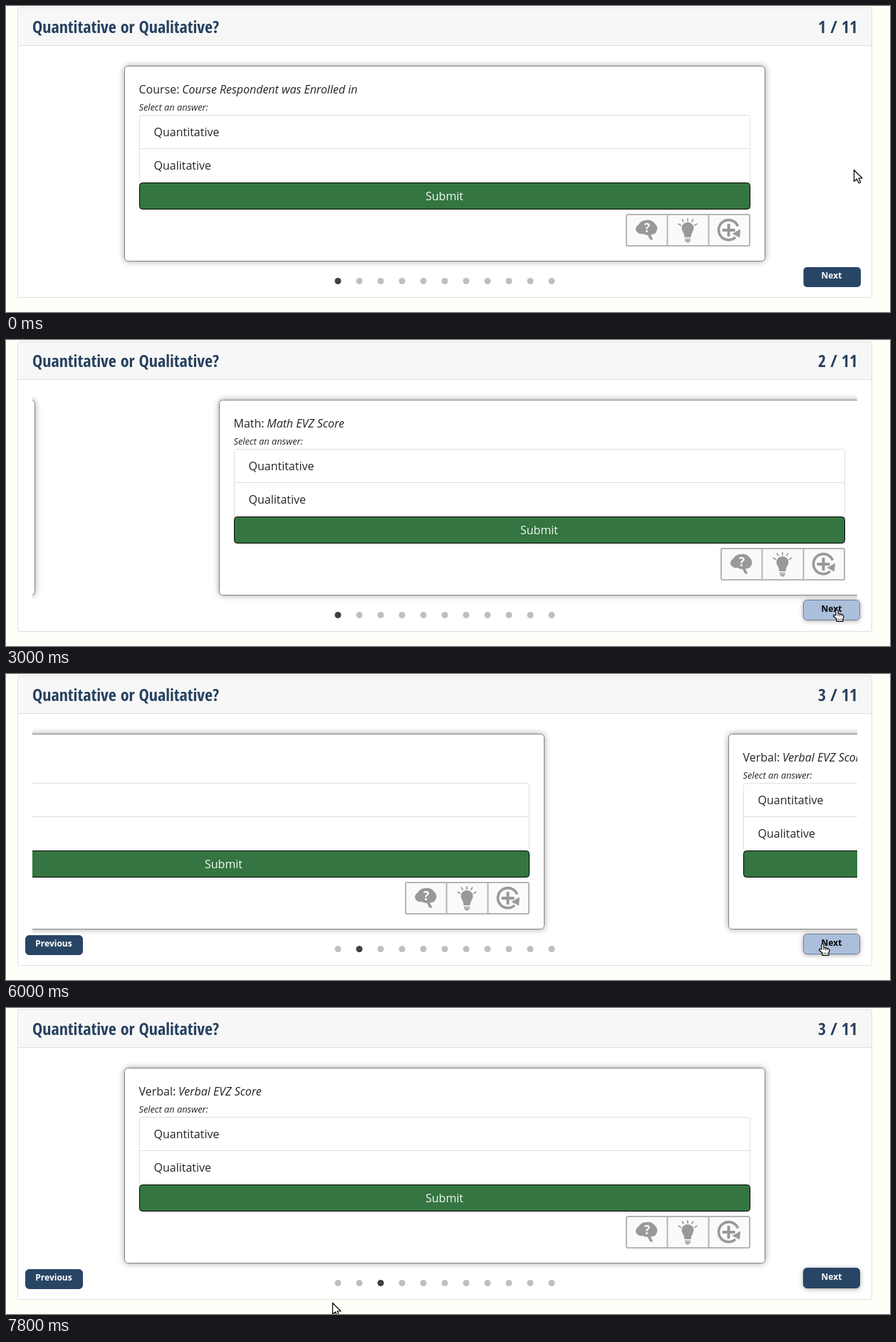
These frames come from a looping animation (1241x430 px, 8000 ms). An HTML page:

```html
<!DOCTYPE html>
<html lang="en">
<head>
<meta charset="utf-8">
<title>Quiz slides</title>
<style>
  html, body { margin: 0; width: 100%; height: 100%; overflow: hidden; background: #fffffa; }
  svg { display: block; width: 1241px; height: 430px; }
  text { font: 16px "Open Sans", sans-serif; fill: #212529; }
  .title { font: 700 24px "Open Sans Condensed", "Open Sans", sans-serif; font-stretch: condensed; fill: #26415f; }
  .hint { font-size: 12.8px; font-style: italic; }
  .italic { font-style: italic; }
  .label { font-size: 12px; font-weight: 700; text-anchor: middle; fill: #fff; }
  .card { fill: #fff; stroke: #858585; filter: drop-shadow(0 0 4px rgba(0, 0, 0, .38)); }
  .line { fill: none; stroke: #dfdfdf; }
  .gray { fill: #999; }
  .stroke { fill: none; stroke: #999; }
  .pointer { fill: #fff; stroke: #000; stroke-width: 1.2; stroke-linejoin: round; }
</style>
</head>
<body>
<svg viewBox="0 0 1241 430">
  <defs>
    <clipPath id="view"><rect x="37" y="70" width="1158" height="300"/></clipPath>
    <g id="card">
      <rect class="card" x="166.5" y="84.5" width="899" height="274" rx="5"/>
      <text class="hint" x="186.5" y="147">Select an answer:</text>
      <path class="line" d="M187.5 248V156.5q0-3 3-3H1041.5q3 0 3 3V248M187 200.5H1045"/>
      <text x="207.5" y="183">Quantitative</text>
      <text x="207.5" y="230">Qualitative</text>
      <rect x="187.5" y="248.5" width="857" height="37" rx="4" fill="#347541" stroke="#000"/>
      <text x="615.5" y="273" text-anchor="middle" style="fill:#f4f8f4">Submit</text>
      <g fill="#f9fafb" stroke="#b5b5b5" stroke-width="2">
        <rect x="871" y="293" width="173" height="44" rx="2"/>
        <path d="M928.5 293V337M986.5 293V337"/>
      </g>
      <path class="gray" d="M884 314c0-4 3-6 5-8 2-4 7-5 10-5 6-1 10 2 12 5 4 3 4 8 2 11-1 3-4 4-6 4l-2 1 3 5-1 2-3-1-3-6c-3 0-5-1-7-2-4 1-9-1-10-6z"/>
      <text x="900" y="317.500" text-anchor="middle" style="font-size:17px;font-weight:700;fill:#fff">?</text>
      <path class="gray" d="M952.5 325q0-4-2-7-2-3-2-6a8.5 8 0 0 1 17 0q0 3-2 6-2 3-2 7z"/>
      <path class="stroke" stroke-width="1.6" d="M953 327.5h8M953 329.700h8M955 331.5h4M957 298v5M949 299.5l2.5 4M965 299.5l-2.5 4M943.5 306l4.5 2.5M970.5 306l-4.5 2.5"/>
      <path class="stroke" stroke-width="3.6" d="M1027.5 309.5a14 14 0 1 0-3.500 15.500"/>
      <path class="stroke" stroke-width="4" d="M1014.5 306V324M1005.5 315H1023.500"/>
      <path class="gray" d="M1031 313.500L1030 325.500L1019.500 320z"/>
    </g>
  </defs>

  <rect x="16.5" y="2.5" width="1199" height="407" rx="2" fill="#fff" stroke="#dfdfdf"/>
  <path d="M17 3H1215V55H17z" fill="#f7f7f7"/>
  <path class="line" d="M17 55.5H1215"/>
  <text class="title" x="37" y="38">Quantitative or Qualitative?</text>
  <text class="title" id="count" x="1195" y="38" text-anchor="end"></text>

  <g clip-path="url(#view)"><g id="track"></g></g>
  <g id="dots"></g>

  <g id="previous">
    <rect x="27.5" y="367.5" width="80" height="27" rx="5" fill="#284565" stroke="#30406b"/>
    <text class="label" x="67" y="383">Previous</text>
  </g>
  <g id="next">
    <rect x="1119.5" height="28" rx="5"/>
    <text class="label" x="1159">Next</text>
  </g>

  <path id="arrow" class="pointer" d="M.5.5V16.5L4.300 13l3 6 2.5-1.200L7 12h5z"/>
  <g id="hand">
    <path class="pointer" d="M-1 8V.8q1.5-1.600 3 0V5.5l2.300.3 2.200.6 2.200.8q1.500.6 1.300 2.500L9 13v3.300H0V13L-4.500 9q.3-2.300 2.200-1.500z"/>
    <path d="M2 6v3M4.500 6.500v3M7 7v2.500M2.500 14.500v-2M4.700 14.500v-2M7 14.500v-2" stroke="#000" stroke-width=".8"/>
  </g>
</svg>
<script>
const $ = id => document.getElementById(id);
const LOOP = 8000, TICK = 100, PITCH = 1158, SLIDE = 500;

const slides = [
  ["Course:", "Course Respondent was Enrolled in"],
  ["Math:", "Math EVZ Score"],
  ["Verbal:", "Verbal EVZ Score"]
];

// Each slide change loses some time while the page lags.
const changes = [
  { start: 2300, lagFrom: 2400, lagTo: 2800, lost: 400 },
  { start: 5780, lagFrom: 5800, lagTo: 6400, lost: 378 }
];
const hovers = [{ enter: 1000, leave: 3700 }, { enter: 4900, leave: 7100 }];
const press = { down: 2200, up: 2900 };
const moves = [
  { start: 0, end: 0, to: [1190, 230] },
  { start: 300, end: 1200, to: [1166, 379] },
  { start: 3500, end: 4200, to: [1105, 407] },
  { start: 4700, end: 5300, to: [1146, 379] },
  { start: 7000, end: 7500, to: [840, 415] },
  { start: 7600, end: 7800, to: [458, 414] }
];

const ramp = (t, from, to) => t >= to ? 1 : Math.max(0, (t - from) / (to - from));
const smooth = u => u * u * (3 - 2 * u);
const easeOut = u => u * (2 - u);
const lerp = (a, b, k) => a.map((v, i) => Math.round(v + (b[i] - v) * k));
const rgb = (a, b, k) => `rgb(${lerp(a, b, k)})`;

// cubic-bezier(.25, .1, .25, 1), solved by bisection
function cssEase(x) {
  if (x <= 0 || x >= 1) return x <= 0 ? 0 : 1;
  let low = 0, high = 1, s;
  for (let i = 0; i < 24; i++) {
    s = (low + high) / 2;
    if (.75 * s * (1 - s) + s ** 3 < x) low = s; else high = s;
  }
  return .3 * s * (1 - s) ** 2 + 3 * (1 - s) * s * s + s ** 3;
}

function progress(change, t) {
  const elapsed = t - change.start - change.lost * ramp(t, change.lagFrom, change.lagTo);
  return cssEase(elapsed / SLIDE);
}

function pointerAt(t) {
  return moves.reduce((at, m) => lerp(at, m.to, easeOut(ramp(t, m.start, m.end))), [0, 0]);
}

$("track").innerHTML = slides.map(([name, detail], i) =>
  `<g transform="translate(${i * PITCH})"><use href="#card"/>
   <text x="186.5" y="123">${name} <tspan class="italic" dx="-.5">${detail}</tspan></text></g>`).join("");
$("dots").innerHTML = Array.from({ length: 11 }, (_, i) =>
  `<circle cx="${466 + 30 * i}" cy="386.5" r="4.5"/>`).join("");

const dots = [...$("dots").children];
const [nextBox, nextText] = $("next").children;

function drawSlides(t) {
  const steps = changes.map(change => progress(change, t));
  const position = steps.reduce((sum, p) => sum + p, 0);
  const active = steps.filter(p => p === 1).length;
  $("track").setAttribute("transform", `translate(${-Math.round(position * PITCH)})`);
  $("count").textContent = `${1 + steps.filter(p => p > 0 || p === 1).length} / 11`;
  dots.forEach((dot, i) => dot.setAttribute("fill", i === active ? "#404040" : "#bfbfbf"));
  $("previous").setAttribute("opacity", smooth(ramp(t, 3230, 4000)));
}

function drawNext(t) {
  const k = hovers.reduce((sum, h) =>
    sum + smooth(ramp(t, h.enter, h.enter + 500)) - smooth(ramp(t, h.leave, h.leave + 400)), 0);
  const focused = t >= press.down, pressed = focused && t < press.up;
  const shade = focused ? .35 : .65 * k;
  nextBox.setAttribute("y", pressed ? 366.5 : focused ? 365.5 : 367);
  nextBox.setAttribute("width", focused ? 79 : 80.5);
  nextBox.setAttribute("fill", rgb([40, 69, 101], [171, 191, 220], k));
  nextBox.setAttribute("stroke", !focused ? "none" : pressed ? "#5c82b4" : rgb([40, 69, 101], [111, 128, 150], k));
  nextBox.style.filter = shade ? `drop-shadow(0 1px 3px rgba(0,0,0,${shade}))` : "none";
  nextText.setAttribute("y", focused ? 382 : 383);
  nextText.style.fill = rgb([255, 255, 255], [0, 0, 0], k);
}

function drawPointer(t) {
  const over = hovers.some(h => t >= h.enter && t < h.leave);
  const shape = $(over ? "hand" : "arrow");
  $("hand").style.display = over ? "" : "none";
  $("arrow").style.display = over ? "none" : "";
  shape.setAttribute("transform", `translate(${pointerAt(t).join(" ")})`);
}

const start = performance.now();
function frame() {
  const t = Math.floor((performance.now() - start) % LOOP / TICK) * TICK;
  drawSlides(t);
  drawNext(t);
  drawPointer(t);
  requestAnimationFrame(frame);
}
frame();
</script>
</body>
</html>
```
